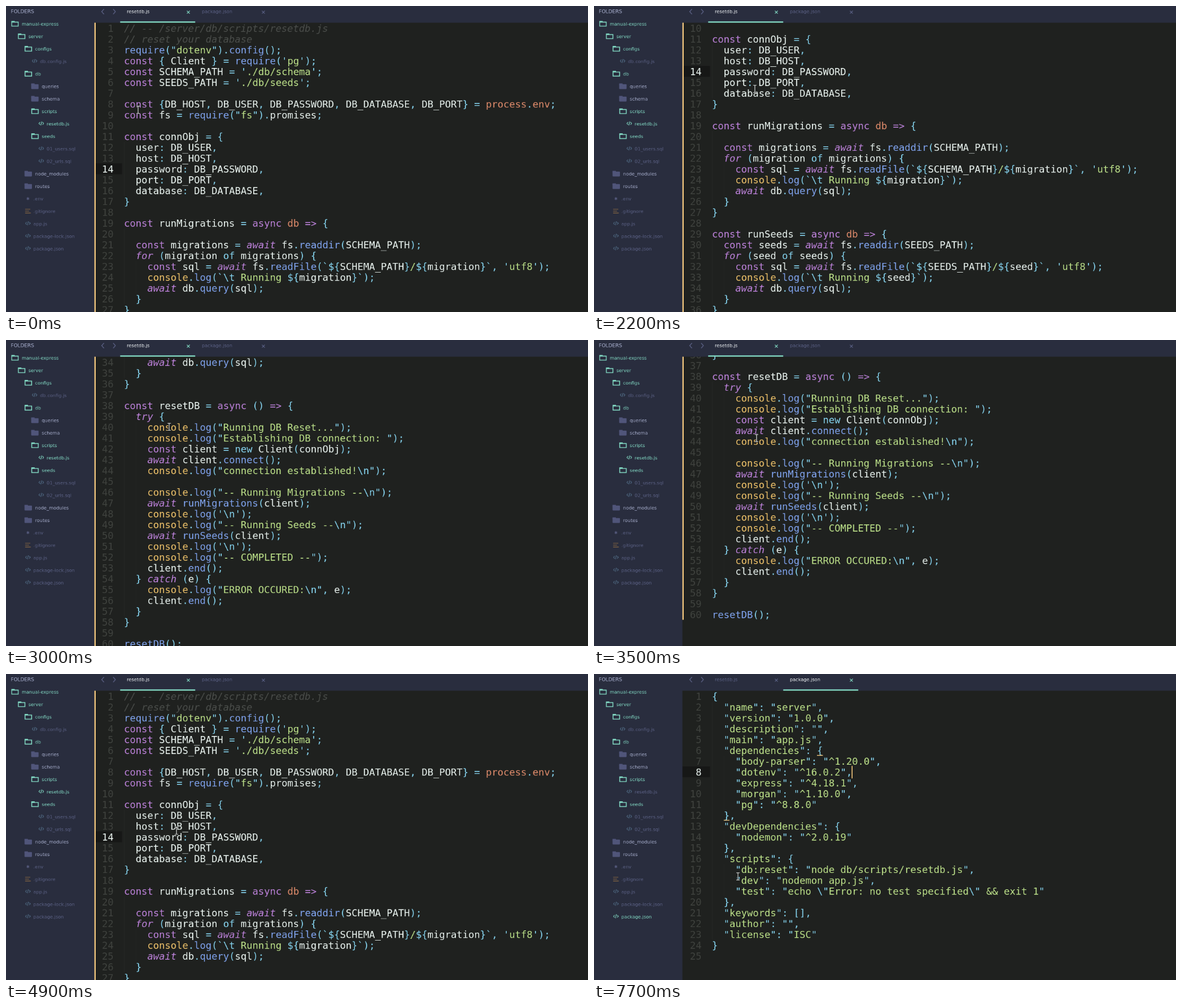
These frames come from a looping animation (1031x543 px, 8 s). An HTML page with a canvas:

```html
<!DOCTYPE html>
<html lang="en">
<head>
<meta charset="utf-8">
<title>Code editor</title>
<style>
  html, body { margin: 0; width: 100%; height: 100%; overflow: hidden; background: #1f211f; }
  canvas { display: block; }
</style>
</head>
<body>
<canvas id="stage" width="1031" height="543"></canvas>

<script type="text/plain" id="tree">
+manual-express
 +server
  +configs
   db.config.js
  +db
   -queries
   -schema
   +scripts
    resetdb.js
   +seeds
    01_users.sql
    02_urls.sql
  -node_modules
  -routes
  .env
  .gitignore
  app.js
  package-lock.json
  package.json
</script>

<script type="text/plain" id="script-file">
// -- /server/db/scripts/resetdb.js
// reset your database
require("dotenv").config();
const { Client } = require('pg');
const SCHEMA_PATH = './db/schema';
const SEEDS_PATH = './db/seeds';

const {DB_HOST, DB_USER, DB_PASSWORD, DB_DATABASE, DB_PORT} = process.env;
const fs = require("fs").promises;

const connObj = {
  user: DB_USER,
  host: DB_HOST,
  password: DB_PASSWORD,
  port: DB_PORT,
  database: DB_DATABASE,
}

const runMigrations = async db => {

  const migrations = await fs.readdir(SCHEMA_PATH);
  for (migration of migrations) {
    const sql = await fs.readFile(`${SCHEMA_PATH}/${migration}`, 'utf8');
    console.log(`\t Running ${migration}`);
    await db.query(sql);
  }
}

const runSeeds = async db => {
  const seeds = await fs.readdir(SEEDS_PATH);
  for (seed of seeds) {
    const sql = await fs.readFile(`${SEEDS_PATH}/${seed}`, 'utf8');
    console.log(`\t Running ${seed}`);
    await db.query(sql);
  }
}

const resetDB = async () => {
  try {
    console.log("Running DB Reset...");
    console.log("Establishing DB connection: ");
    const client = new Client(connObj);
    await client.connect();
    console.log("connection established!\n");

    console.log("-- Running Migrations --\n");
    await runMigrations(client);
    console.log('\n');
    console.log("-- Running Seeds --\n");
    await runSeeds(client);
    console.log('\n');
    console.log("-- COMPLETED --");
    client.end();
  } catch (e) {
    console.log("ERROR OCCURED:\n", e);
    client.end();
  }
}

resetDB();
</script>

<script type="text/plain" id="package-file">
{
  "name": "server",
  "version": "1.0.0",
  "description": "",
  "main": "app.js",
  "dependencies": {
    "body-parser": "^1.20.0",
    "dotenv": "^16.0.2",
    "express": "^4.18.1",
    "morgan": "^1.10.0",
    "pg": "^8.8.0"
  },
  "devDependencies": {
    "nodemon": "^2.0.19"
  },
  "scripts": {
    "db:reset": "node db/scripts/resetdb.js",
    "dev": "nodemon app.js",
    "test": "echo \"Error: no test specified\" && exit 1"
  },
  "keywords": [],
  "author": "",
  "license": "ISC"
}
</script>

<script>
const stage = document.getElementById('stage');
const view = stage.getContext('2d');
const W = 1031, H = 543, LOOP = 8000, STEP = 100;

// The editor is laid out on a finer pixel grid, then scaled down to the stage.
const screen = document.createElement('canvas');
screen.width = 1396;
screen.height = 735;
const ctx = screen.getContext('2d');
const PX = W / screen.width;
ctx.scale(1 / PX, 1 / PX);

const SIDE = 212 * PX, TOP = 40 * PX, ROW = 26 * PX, BASE = 22 * PX;
const LEFT = 283 * PX, ADV = 14 * PX;
const MONO = `${23.25 * PX}px "DejaVu Sans Mono", monospace`;
const UI = `${11.1 * PX}px "DejaVu Sans", sans-serif`;

const C = {
  editor: '#1f211f', panel: '#292d3e', active: '#161716', guide: '#252825',
  number: '#40433f', comment: '#4b4e4b', white: '#eef8f4', cyan: '#89d9f5',
  green: '#c0e58c', purple: '#c084de', blue: '#82a6f2', yellow: '#f2c56c',
  orange: '#e08c6c', teal: '#84dcc6', dim: '#5d6387', folder: '#50557a',
  label: '#a9b0cf', codeIcon: '#54708a', listIcon: '#806443', bar: '#f6c97e'
};

// Syntax rules: pattern, colour, italic
const RULES = [
  [/^\/\/.*/, C.comment, true],
  [/^\s+/, C.white],
  [/^(const|async)\b|^=>/, C.purple],
  [/^(await|for|try|catch)\b/, C.purple, true],
  [/^(of|new)\b/, C.cyan],
  [/^console\b/, C.yellow],
  [/^(process|env)\b|^db(?= =>)/, C.orange],
  [/^Client\b/, C.white],
  [/^\w+(?=\()/, C.blue],
  [/^\w+/, C.white],
  [/^./, C.cyan]
];

function tokenize(line) {
  const out = [];
  let quote = '', hole = false;
  for (let col = 0; col < line.length;) {
    const rest = line.slice(col);
    let text, color, italic = false;
    if (quote && !hole) {
      text = rest.match(/^(\\.|\$\{|[`'"]|[^\\$`'"]+|.)/)[0];
      color = text[0] === '\\' || text === quote || text === '${' ? C.cyan : C.green;
      if (text === quote) quote = '';
      if (text === '${') hole = true;
    } else {
      const rule = RULES.find(r => r[0].test(rest));
      text = rest.match(rule[0])[0];
      [, color, italic] = rule;
      if (/^[`'"]$/.test(text)) quote = text;
      if (hole && text === '}') hole = false;
    }
    out.push({ text, color, italic, col });
    col += text.length;
  }
  return out;
}

const readLines = id =>
  document.getElementById(id).textContent.replace(/^\n|\n$/g, '').split('\n');

function load(id, active, trailing) {
  const lines = readLines(id).concat(trailing);
  return {
    active,
    lines: lines.map((s, i) => ({
      tokens: tokenize(s),
      indent: Math.max(0, (lines.slice(i).find(l => l.trim()) || '').search(/\S/))
    }))
  };
}

const scriptFile = load('script-file', 14, []);
const packageFile = load('package-file', 8, ['']);

const KINDS = { '+': 'open', '-': 'shut' };
const tree = readLines('tree').map(line => {
  const [, indent, mark, label] = line.match(/^( *)([+-]?)(.*)$/);
  const kind = KINDS[mark] || { '.env': 'star', '.gitignore': 'list' }[label] || 'code';
  return { kind, label, depth: indent.length };
});

// Pointer moves: start, end, x, y
const MOVES = [
  [0, 400, 47, 230], [400, 500, 101, 222], [600, 700, 101, 217],
  [1400, 1700, 280, 40], [2000, 2200, 285, 147], [2200, 2700, 289, 154],
  [3300, 3500, 288, 174], [3500, 3900, 318, 296], [4300, 4900, 302, 278],
  [5100, 5700, 458, 20], [5700, 6000, 364, 11], [6400, 6700, 332, 77],
  [6800, 7300, 251, 290], [7300, 7500, 287, 330], [7600, 7700, 255, 359]
];

const progress = (t, from, to) => Math.min(1, Math.max(0, (t - from) / (to - from)));

function pointerAt(t) {
  let x = 234, y = 184;
  for (const [from, to, nx, ny] of MOVES) {
    const p = progress(t, from, to), ease = p * p * (3 - 2 * p);
    x += (nx - x) * ease;
    y += (ny - y) * ease;
  }
  return [x, y];
}

// One wheel notch of three rows per step down to the end, then a fling back to the top.
function scrollAt(t) {
  const end = 928 * PX;
  if (t < 2100) return 0;
  if (t < 3400) return 3 * ROW * Math.min(11, (t - 1900) / STEP);
  return end * (1 - progress(t, 4200, 4900) ** 1.23);
}

function rect(x, y, w, h, color) {
  ctx.fillStyle = color;
  ctx.fillRect(x, y, w, h);
}

function text(s, x, y, color, font) {
  ctx.font = font;
  ctx.fillStyle = color;
  ctx.fillText(s, x, y);
}

function path(points, color, width) {
  ctx.beginPath();
  points.forEach(([x, y]) => ctx.lineTo(x, y));
  ctx.strokeStyle = color;
  ctx.lineWidth = width;
  ctx.stroke();
}

function drawEditor(file, scroll) {
  const cellX = col => LEFT + col * ADV;
  const rowY = n => TOP + (n - 1) * ROW - scroll;
  rect(SIDE, 0, W, H, C.editor);
  file.lines.forEach((line, i) => {
    const y = rowY(i + 1), base = y + BASE;
    if (y < TOP - ROW || y > H) return;
    const current = i + 1 === file.active;
    if (current) rect(SIDE, y, 205.5 - SIDE, ROW, C.active);
    ctx.textAlign = 'right';
    text(i + 1, 258 * PX, base, current ? C.white : C.number, MONO);
    ctx.textAlign = 'left';
    for (let col = 0; col < line.indent; col += 2) rect(cellX(col), y, PX, ROW, C.guide);
    for (const k of line.tokens)
      text(k.text, cellX(k.col), base, k.color, (k.italic ? 'italic ' : '') + MONO);
  });
  if (file === scriptFile) {
    rect(SIDE, 0, 3 * PX, rowY(file.lines.length + 1), C.bar);
  } else {
    rect(cellX(24) - PX, rowY(8) - 1, 2 * PX, ROW + 3, C.bar);
    for (const [col, row] of [[18, 6], [2, 12]])
      rect(cellX(col), rowY(row) + ROW - 1, ADV, 1.2, C.bar);
  }
}

function drawIcon(kind, x, y, lit) {
  if (kind === 'open') {
    ctx.strokeStyle = C.teal;
    ctx.lineWidth = 1.4;
    ctx.strokeRect(x + 0.9, y - 3, 11.6, 7.2);
    rect(x + 0.2, y - 5, 6, 2.2, C.teal);
  } else if (kind === 'shut') {
    rect(x, y - 5, 6, 3, C.folder);
    ctx.beginPath();
    ctx.roundRect(x, y - 3.6, 13, 8.6, 1);
    ctx.fill();
  } else if (kind === 'code') {
    const color = lit ? C.teal : C.codeIcon, cx = x + 6, cy = y - 0.5;
    for (const side of [-1, 1])
      path([[cx + side * 2.2, cy - 2.3], [cx + side * 4.2, cy], [cx + side * 2.2, cy + 2.3]], color, 1);
    path([[cx + 0.8, cy - 3.5], [cx - 0.8, cy + 3.5]], color, 1);
  } else if (kind === 'star') {
    for (let a = 0; a < Math.PI; a += Math.PI / 3) {
      const dx = 2.7 * Math.sin(a), dy = 2.7 * Math.cos(a);
      path([[x + 6 - dx, y - dy], [x + 6 + dx, y + dy]], C.dim, 1);
    }
  } else {
    [9, 7, 10].forEach((w, i) => rect(x + 1, y - 4 + i * 3.4, w, 1.2, C.listIcon));
  }
}

function drawSidebar(open) {
  rect(0, 0, SIDE, H, C.panel);
  text('FOLDERS', 8.5, 17 * PX, C.label, UI.replace(/^[\d.]+/, 12 * PX));
  tree.forEach(({ kind, label, depth }, i) => {
    const x = 9.2 + depth * 16 * PX, base = (47 + i * 30) * PX;
    const lit = label === open, file = !['open', 'shut'].includes(kind);
    const color = kind === 'open' || lit ? C.teal : file ? C.dim : C.label;
    drawIcon(kind, x, base - 3.2, lit);
    text(label, x + (file ? 15.6 : 18.7), base, color, UI);
  });
}

function drawTabs(open) {
  const width = 180 * PX;
  rect(SIDE, 0, W, TOP, C.panel);
  for (const [x, side] of [[171.5, 1], [191.8, -1]])
    path([[x + side * 2, 5.5], [x - side * 2, 10], [x + side * 2, 14.5]], C.dim, 1.3);
  ['resetdb.js', 'package.json'].forEach((name, i) => {
    const x = 202.3 + i * width, cx = x + 120.7;
    const lit = name === open, mark = lit ? C.teal : C.dim;
    text(name, x + 11.7, 17 * PX, lit ? '#f4f8fa' : C.dim, UI);
    for (const d of [-2.5, 2.5]) path([[cx - d, 8.5], [cx + d, 13.5]], mark, 1.2);
    if (lit) rect(x, TOP - 3 * PX, width, 3 * PX, C.teal);
  });
}

function drawPointer(x, y) {
  if (x < SIDE || y < TOP) {
    ctx.beginPath();
    [[0, 0], [0, 11], [2.6, 8.7], [4.4, 12.7], [6, 12], [4.3, 8.1], [7.8, 8]]
      .forEach(([dx, dy]) => ctx.lineTo(x + dx, y + dy));
    ctx.closePath();
    ctx.fillStyle = '#111';
    ctx.fill();
    ctx.strokeStyle = '#f2f2f2';
    ctx.lineWidth = 0.9;
    ctx.stroke();
    return;
  }
  for (const [color, width] of [['#101110', 2.8], ['#e8ecea', 1.1]]) {
    path([[x, y - 6], [x, y + 6]], color, width);
    for (const dy of [-6.3, 6.3]) path([[x - 3, y + dy], [x + 3, y + dy]], color, width);
  }
}

function draw(now) {
  const t = Math.floor(now % LOOP / STEP) * STEP;
  const first = t < 6100;
  const open = first ? 'resetdb.js' : 'package.json';
  drawEditor(first ? scriptFile : packageFile, scrollAt(t));
  drawSidebar(open);
  drawTabs(open);
  drawPointer(...pointerAt(t));
  view.drawImage(screen, 0, 0, W, H);
}

const start = performance.now();
function tick() {
  draw(performance.now() - start);
  requestAnimationFrame(tick);
}
tick();
</script>
</body>
</html>
```
